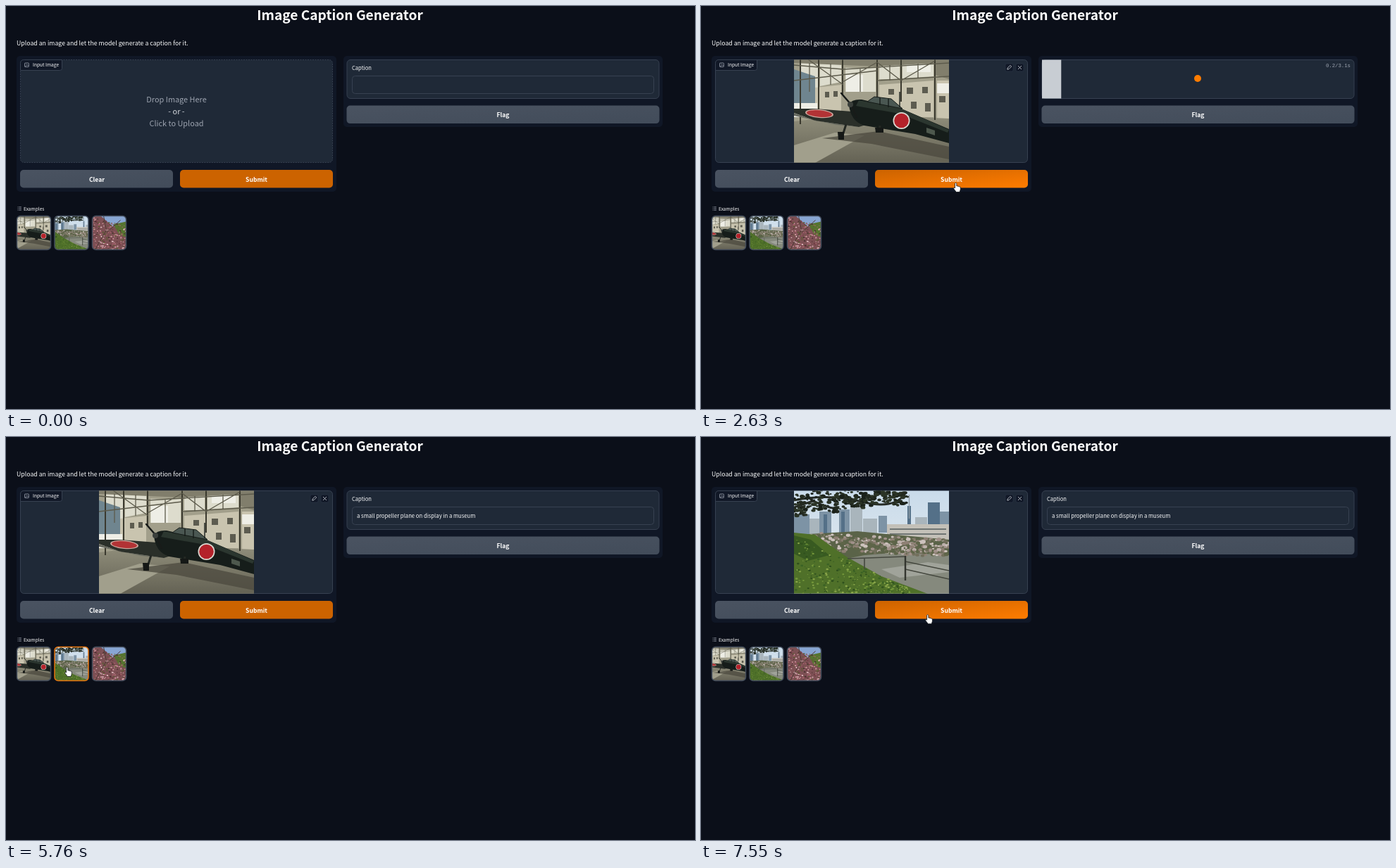
These frames come from a looping animation (978 px wide and 573 px high, 8 s). An HTML page:

```html
<!DOCTYPE html>
<html lang="en">
<head>
<meta charset="utf-8">
<title>Image Caption Generator</title>
<style>
  html, body { margin: 0; width: 100%; height: 100%; overflow: hidden; background: #0b0f19; }
  svg { display: block; }
  text { font-family: "Noto Sans CJK JP", "Noto Sans CJK SC", "Noto Sans CJK", "Open Sans", sans-serif; fill: #f9fafb; white-space: pre; }
  .mid { text-anchor: middle; }
  .bold { font-weight: 700; fill: #fff; }
  .mono { font: 7.3px "Liberation Mono", "DejaVu Sans Mono", monospace; fill: #9ca3af; text-anchor: end; }
  .panel { fill: #101726; }
  .block { fill: #1f2937; stroke: #374151; }
  .tag { fill: #111827; stroke: #374151; }
  .tool { fill: #111827; stroke: #2d3848; stroke-width: .6; }
  .icon { fill: none; stroke: #d1d5db; stroke-width: .8; stroke-linejoin: round; }
  .thumb { fill: none; stroke-width: 1.5; }
</style>
</head>
<body>
<svg id="stage" width="978" height="573" viewBox="0 0 978 573">
  <defs>
    <linearGradient id="grey" x2="1" y2="1"><stop stop-color="#4a5361"/><stop offset="1" stop-color="#424c5a"/></linearGradient>
    <linearGradient id="hot" x2="1" y2="1"><stop stop-color="#cc6300"/><stop offset="1" stop-color="#ff7c00"/></linearGradient>
    <linearGradient id="floor" x2="0" y2="1"><stop stop-color="#918f7c"/><stop offset="1" stop-color="#646254"/></linearGradient>
    <linearGradient id="sky" x2="0" y2="1"><stop stop-color="#c9dbea"/><stop offset="1" stop-color="#e8edf0"/></linearGradient>
    <clipPath id="round">
      <rect x="15.5" y="298.5" width="48" height="48" rx="5"/>
      <rect x="69" y="298.5" width="48" height="48" rx="5"/>
      <rect x="122.5" y="298.5" width="48" height="48" rx="5"/>
    </clipPath>

    <symbol id="plane" viewBox="0 0 220 147" preserveAspectRatio="xMidYMid slice">
      <path fill="#a29f8b" d="M0 0H220V147H0Z"/>
      <path fill="#dddccd" d="M10 4H34V40L10 48ZM37 6H67V32L37 38ZM73 12H116V46H73ZM121 8H150V28H121ZM154 6H198V24L154 27Z"/>
      <path fill="#6f858f" d="M0 14L30 24V62H0Z"/>
      <path fill="#c9c4af" d="M30 40L67 36V76H30ZM121 36L198 30V82H121ZM203 30H220V84H203Z"/>
      <path fill="#eeeee6" d="M0 62H33V82H0ZM74 22H98V46H74ZM160 8H194V18H160ZM203 34H220V48H203Z"/>
      <path fill="#5d5c50" d="M134 42h8v8h-8zM160 40h9v9h-9zM182 39h8v9h-8zM206 52h9v9h-9zM44 46h6v8h-6zM56 45h6v8h-6zM186 62h8v12h-8zM166 60h8v10h-8z"/>
      <path fill="#817e6c" d="M0 0H220V4L118 10L0 5ZM200 4H220V28L200 22Z"/>
      <path fill="url(#floor)" d="M0 88L90 78L220 84V147H0Z"/>
      <path fill="#a19f8c" d="M0 122L58 104L100 108L30 147H0Z"/>
      <path fill="#4b493e" opacity=".75" d="M40 112L120 102L220 124V142L110 120Z"/>
      <path fill="none" stroke="#3a392e" stroke-width="2" d="M9 0V92M35 0V74M69 0V50M118 0V55M152 0V60M200 0V86"/>
      <path fill="none" stroke="#5c5a4b" stroke-width="1.3" d="M0 8L70 14L220 5M0 30L118 16M118 30L220 24M20 0L70 36M69 32L118 4L152 30L200 2M94 12V46M136 8V30M176 6V26M22 5V46M52 6V36"/>
      <path fill="#2a2f29" d="M0 70L30 70L95 75L118 88L92 96L30 87L0 76Z"/>
      <path fill="#686a60" d="M0 76L30 87L92 96L60 93L0 80Z"/>
      <ellipse cx="36" cy="77" rx="20" ry="6" fill="#cba69c" transform="rotate(5 36 77)"/>
      <ellipse cx="36" cy="77" rx="18" ry="4.8" fill="#b23335" transform="rotate(5 36 77)"/>
      <path fill="#161d1a" d="M78 64Q82 56 96 57L150 69L220 99V119L172 106L100 94Q80 88 78 64Z"/>
      <path fill="#2b362f" d="M92 58L150 69L220 100L218 104L150 77L88 66Z"/>
      <path fill="#4a5752" stroke="#161c19" d="M104 60L114 53L138 56L154 70Z"/>
      <path stroke="#161c19" d="M122 54V65M134 56V68M150 46V68" stroke-width="1.4"/>
      <path fill="none" stroke="#181b19" stroke-width="2.4" stroke-linecap="round" d="M67 48L80 63L89 82"/>
      <circle cx="80" cy="64" r="4" fill="#3a3f3b"/>
      <path stroke="#242823" stroke-width="3" d="M74 92L69 108M122 94L121 101"/>
      <path fill="#151816" d="M62 103h9v11h-8zM115 97h12v7h-11z"/>
      <path fill="#4d584d" d="M188 97l12 4v7l-12-4z"/>
      <circle cx="152.500" cy="87" r="12" fill="#dcd8d0"/><circle cx="152.500" cy="87" r="10.300" fill="#b4222a"/>
    </symbol>

    <symbol id="river" viewBox="0 0 220 147" preserveAspectRatio="xMidYMid slice">
      <path fill="url(#sky)" d="M0 0H220V147H0Z"/>
      <path fill="#7d93a5" d="M0 34h22v30H0zM36 30h17v35H36zM64 27h15v38H64zM206 30h14v30h-14zM120 36h12v24h-12z"/>
      <path fill="#a9b5bc" d="M22 40h14v25H22zM80 22h17v43H80zM98 40h20v25H98zM172 38h17v20h-17z"/>
      <path fill="#547088" d="M190 17h17v40h-17zM67 30h5v30h-5zM161 22h5v35h-5zM42 34h5v28h-5z"/>
      <path stroke="#8e9ba5" stroke-width="1.4" d="M163.500 6V40"/>
      <path fill="#c3c0b8" d="M132 48H220V70H132Z"/>
      <path fill="#6f7573" d="M136 54h80v2h-80zM136 61h80v2h-80z"/>
      <path fill="#5a6348" d="M20 62L90 58L220 70V94L90 100L30 82Z"/>
      <path fill="#85897d" d="M60 100L100 92L150 88L220 92V147H140Z"/>
      <path fill="#a0a39a" d="M124 112L190 102L220 106V116L150 124Z"/>
      <g id="blossom"></g>
      <path fill="#4f7029" d="M0 60L30 63L74 94L124 122L190 147H0Z"/>
      <path fill="#385a21" d="M0 64L24 70L50 92L20 100L0 90Z"/>
      <g id="grass"></g>
      <path fill="none" stroke="#262b26" stroke-width="3" d="M0 14Q50 4 96 16T158 4M20 10Q40 24 62 26M0 24L30 14"/>
      <g id="needles"></g>
      <path fill="none" stroke="#45483f" stroke-width="1.6" d="M76 97L158 94M100 97V112M158 101L220 114M158 112L220 126"/>
      <path stroke="#33362f" stroke-width="2.4" d="M158 93V128"/>
    </symbol>

    <symbol id="pink" viewBox="0 0 48 48">
      <path fill="#7d5054" d="M0 0H48V48H0Z"/>
      <path fill="#88a6d3" d="M12 0H48V20L28 14Z"/>
      <path fill="#56742f" d="M30 12L48 8V30L38 26Z"/>
      <g id="petals"></g>
      <path fill="none" stroke="#4c3a34" d="M4 48L20 20L16 0M20 24L40 6"/>
    </symbol>

    <path id="hand" fill="#fff" stroke="#14171c" stroke-width=".8" stroke-linejoin="round"
      d="M1 1.300Q2.200-.6 3.300 1.300V5Q4.600 4.200 5.300 5.400Q6.600 4.800 7.100 6Q8.500 5.600 8.800 7V10L7.600 13.500H2.800L-.8 8.800Q-1.200 7 .3 7.200L1 8Z"/>
    <path id="arrow" fill="#fff" stroke="#14171c" stroke-width=".6" d="M0 0V11L2.400 8.800L4 12.600L5.700 11.900L4.100 8.200H7.400Z"/>
  </defs>

  <path fill="#0b0f19" d="M0 0H978V573H0Z"/>
  <text class="mid bold" x="474" y="20" font-size="19.15">Image Caption Generator</text>
  <text x="15" y="56" font-size="8.76">Upload an image and let the model generate a caption for it.</text>

  <rect class="panel" x="15" y="71" width="454" height="193" rx="5"/>
  <rect class="panel" x="479" y="71" width="453" height="101" rx="5"/>

  <rect id="drop" class="block" x="20.500" y="76.500" width="443" height="146" rx="5"/>
  <g id="upload" class="mid" font-size="10.9">
    <text x="242" y="136.500" style="fill:#9ca3af">Drop Image Here</text>
    <text x="242" y="153.800" style="fill:#d1d5db">- or -</text>
    <text x="242" y="171" style="fill:#9ca3af">Click to Upload</text>
  </g>
  <g id="photo">
    <use id="picture" href="#plane" x="132" y="76.500" width="220" height="146"/>
    <rect class="tool" x="432" y="82" width="11" height="11" rx="2"/>
    <rect class="tool" x="447" y="82" width="11" height="11" rx="2"/>
    <path class="icon" d="M434.800 90.200L435.300 88L439 84.300L440.700 86L437 89.700ZM450 85L455 90M455 85L450 90"/>
  </g>
  <path class="tag" d="M20.500 91.500V81.500Q20.500 76.500 25.500 76.500H79.500V88.500Q79.500 91.500 76.500 91.500Z"/>
  <g class="icon" style="stroke:#9ca3af">
    <rect x="26.500" y="81" width="5.800" height="5.600" rx=".8"/>
    <path d="M27 86.200L30 83.600L32.200 85.400M28.200 82.600h.6"/>
  </g>
  <text x="38" y="86.100" font-size="6.6">Input Image</text>
  <g id="loadLeft">
    <rect class="block" x="20.500" y="76.500" width="443" height="146" rx="5"/>
    <circle cx="241" cy="148.500" r="5" fill="#ff7c00"/>
    <text id="timeLeft" class="mono" x="459" y="86.500"></text>
  </g>

  <rect x="20" y="233" width="217" height="25.5" rx="5" fill="url(#grey)"/>
  <rect id="submit" x="247" y="233" width="217" height="25.5" rx="5"/>
  <text class="mid bold" x="129" y="249.600" font-size="8.6">Clear</text>
  <text class="mid bold" x="355.500" y="249.600" font-size="8.6">Submit</text>

  <rect class="block" x="484" y="76.500" width="443" height="55" rx="5"/>
  <g id="result">
    <text x="491" y="91" font-size="7.6">Caption</text>
    <rect class="block" x="491.500" y="99.500" width="428" height="25" rx="4"/>
    <text id="caption" x="498" y="115.400" font-size="7.69">a small propeller plane on display in a museum</text>
  </g>
  <g id="loadRight">
    <rect id="bar" x="484" y="76.500" height="55" fill="#c8cdd3"/>
    <circle cx="705" cy="103" r="5" fill="#ff7c00"/>
    <text id="timeRight" class="mono" x="922" y="86.500"></text>
  </g>
  <rect x="483.500" y="141.600" width="444" height="25.5" rx="5" fill="url(#grey)"/>
  <text class="mid bold" x="705.500" y="158.200" font-size="8.6">Flag</text>

  <path stroke="#9ca3af" stroke-width=".8" d="M16.500 285.800h1M16.500 288h1M16.500 290.200h1M18.300 285.800h3.500M18.300 288h3.500M18.300 290.200h3.500"/>
  <text x="25" y="290.500" font-size="6.6">Examples</text>
  <g clip-path="url(#round)">
    <use href="#plane" x="15.500" y="298.500" width="48" height="48"/>
    <use href="#river" x="69" y="298.500" width="48" height="48"/>
    <use href="#pink" x="122.500" y="298.500" width="48" height="48"/>
  </g>
  <rect class="thumb" x="15.500" y="298.500" width="48" height="48" rx="5"/>
  <rect class="thumb" x="69" y="298.500" width="48" height="48" rx="5"/>
  <rect class="thumb" x="122.500" y="298.500" width="48" height="48" rx="5"/>
  <use id="cursor" href="#arrow"/>
</svg>

<script>
const LOOP = 8000;
const $ = id => document.getElementById(id);
const thumbs = [...document.querySelectorAll('.thumb')];

let seed = 7;
const rnd = () => (seed = seed * 16807 % 2147483647) / 2147483647;

// Scatters small blobs; place(u, v) maps two random numbers to a point.
function scatter(id, count, size, colours, place) {
  let out = '';
  for (let i = 0; i < count; i++) {
    const [x, y] = place(rnd(), rnd());
    const r = size * (.5 + rnd());
    const c = colours[Math.floor(rnd() * colours.length)];
    out += `<ellipse cx="${x.toFixed(1)}" cy="${y.toFixed(1)}" rx="${r.toFixed(1)}" ry="${(r * .7).toFixed(1)}" fill="${c}"/>`;
  }
  $(id).innerHTML = out;
}
scatter('blossom', 380, 2.4, ['#bdb0ab', '#a09089', '#cdc2bd', '#726f5c', '#8e8074', '#5f6549'],
  (u, v) => [24 + u * 196, 60 + u * 10 + v * 25]);
scatter('grass', 420, 1.3, ['#72963a', '#3b6225', '#8aa64a', '#2f501d', '#4f7029'],
  (u, v) => [u * 165, 66 + u * 74 + v * (81 - u * 74)]);
scatter('needles', 330, 2.4, ['#1a211a', '#2b3426', '#232a20'],
  (u, v) => [u * 162, 1 + v * (34 - u * 18) + 3 * Math.sin(u * 22)]);
scatter('petals', 300, 1, ['#cf949d', '#a9626d', '#e0b9be', '#6f3a42', '#5d5a35', '#493231'],
  (u, v) => [u * 48, Math.min(48, u * 15 + v * 48)]);

// Time, x and y of the pointer tip.
const path = [
  [460, 235, 543], [1030, 40, 318], [1540, 40, 318], [2090, 361, 253],
  [2270, 361, 253], [2330, 359.5, 251], [2650, 359.5, 251], [2720, 358.8, 251],
  [4510, 358.8, 251], [5280, 214.500, 322], [5340, 214.500, 322], [5760, 84.5, 327],
  [6500, 84.5, 327], [6860, 226, 304], [7250, 316, 263], [7310, 316, 263], [7550, 319.6, 252.2]
];

function pointer(t) {
  const i = path.findIndex(p => p[0] > t);
  if (i < 0) return path[path.length - 1].slice(1);
  const [t0, x0, y0] = path[Math.max(0, i - 1)], [t1, x1, y1] = path[i];
  const k = Math.max(0, Math.min(1, (t - t0) / (t1 - t0 || 1)));
  const e = k * k * (3 - 2 * k);
  return [x0 + (x1 - x0) * e, y0 + (y1 - y0) * e];
}

const between = (t, a, b) => t >= a && t < b;
const show = (id, on) => $(id).setAttribute('visibility', on ? 'visible' : 'hidden');
const set = (id, name, value) => $(id).setAttribute(name, value);
const inside = (el, x, y) => {
  const [l, top, w, h] = ['x', 'y', 'width', 'height'].map(n => +el.getAttribute(n));
  return x >= l && x <= l + w && y >= top && y <= top + h;
};

const FIRST = [1430, 1700], SECOND = [6760, 6990], CAPTION = [2510, 3210];

function draw(t) {
  const [x, y] = pointer(t);
  const shown = t >= 460;
  const onSubmit = shown && inside($('submit'), x, y);
  let hand = onSubmit;

  thumbs.forEach((el, i) => {
    const over = shown && inside(el, x, y);
    const focused = i === 0 && between(t, ...FIRST) || i === 1 && between(t, 6500, SECOND[1]);
    hand = hand || over;
    el.setAttribute('stroke', over || focused ? '#e8760f' : '#434d5c');
  });

  show('cursor', shown);
  set('cursor', 'href', hand ? '#hand' : '#arrow');
  set('cursor', 'transform', `translate(${x} ${y})`);
  set('submit', 'fill', onSubmit ? 'url(#hot)' : '#cc6300');

  const loaded = t >= FIRST[1];
  show('upload', !loaded);
  show('photo', loaded);
  set('drop', 'stroke-dasharray', loaded ? 'none' : '2 1.5');
  set('picture', 'href', t < SECOND[1] ? '#plane' : '#river');

  const load = [FIRST, SECOND].find(span => between(t, ...span));
  show('loadLeft', load);
  if (load) {
    set('loadLeft', 'opacity', Math.min(1, (t - load[0] + 5) / 90));
    $('timeLeft').textContent = Math.max(.1, (t - load[0]) / 1000).toFixed(1) + 's';
  }

  const busy = between(t, ...CAPTION);
  const spent = Math.max(0, (t - 2440) / 1000);
  show('loadRight', busy);
  show('result', !busy);
  $('caption').style.display = t >= CAPTION[1] ? '' : 'none';
  if (busy) {
    set('bar', 'width', 443 * spent / 3.1);
    $('timeRight').textContent = spent.toFixed(1) + '/3.1s';
  }
}

const start = performance.now();
function tick() {
  draw((performance.now() - start) % LOOP);
  requestAnimationFrame(tick);
}
tick();
</script>
</body>
</html>
```
